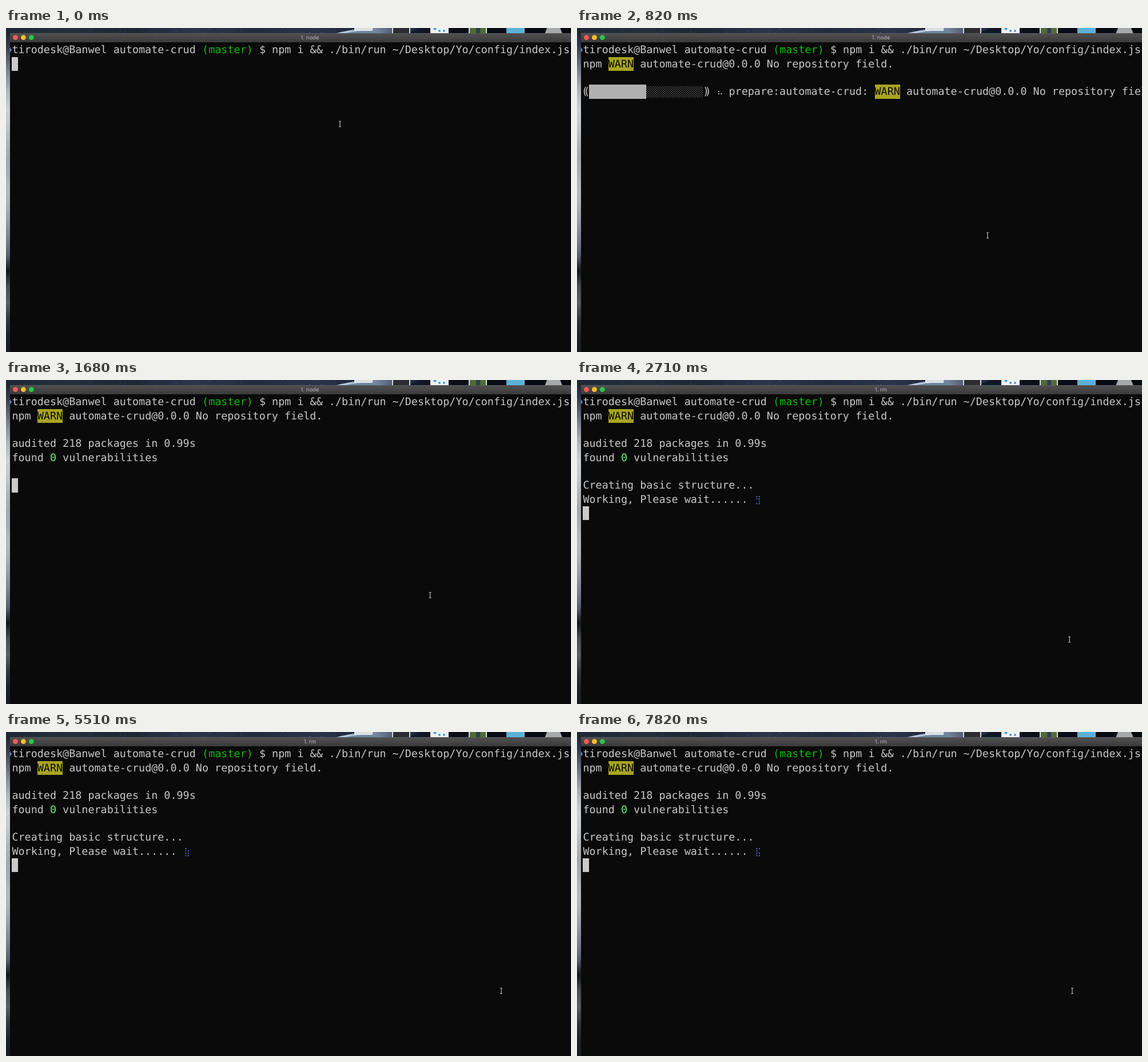
An HTML page with a canvas for the animation above (7.99 s loop, 988x567 px).

```html
<!DOCTYPE html>
<html lang="en">
<head>
<meta charset="utf-8">
<title>Terminal</title>
<style>
  html, body { margin: 0; width: 100%; height: 100%; overflow: hidden; background: #0a0a0a; }
  canvas { display: block; }
</style>
</head>
<body>
<canvas id="stage" width="988" height="567"></canvas>
<script>
const ctx = document.getElementById('stage').getContext('2d');
const LOOP = 7990;
const CELL = 11.09, LINE = 24.3, LEFT = 10.4, TOP = 26.4;
const FG = '#c7c7c7', GREY = '#b0b0b0', YELLOW = '#a9a51f';

const colX = col => LEFT + col * CELL;
const rowY = row => TOP + row * LINE;

function rect(x, y, w, h, fill) {
  ctx.fillStyle = fill;
  ctx.fillRect(x, y, w, h);
}

// Fills whole terminal cells, snapped to pixels.
function cells(row, col, count, fill) {
  const x = Math.round(colX(col)), y = Math.round(rowY(row));
  rect(x, y, Math.round(colX(col + count)) - x, Math.round(rowY(row + 1)) - y, fill);
}

function disc(x, y, r, fill) {
  ctx.fillStyle = fill;
  ctx.beginPath();
  ctx.arc(x, y, r, 0, Math.PI * 2);
  ctx.fill();
}

function gradient(x, y, colors) {
  const g = ctx.createLinearGradient(0, 0, x, y);
  colors.split(' ').forEach((c, i, all) => g.addColorStop(i / (all.length - 1), c));
  return g;
}

function text(row, col, string, color = FG, back) {
  if (back) cells(row, col, string.length, back);
  ctx.font = '18.42px "DejaVu Sans Mono", monospace';
  ctx.textRendering = 'geometricPrecision';
  ctx.textAlign = 'left';
  ctx.fillStyle = color;
  ctx.fillText(string, colX(col), rowY(row) + 18);
}

// Dot positions in braille bit order, as [column, line].
const DOTS = [[0, 0], [0, 1], [0, 2], [1, 0], [1, 1], [1, 2], [0, 3], [1, 3]];
function braille(row, col, char, color) {
  const bits = char.charCodeAt(0) - 0x2800;
  DOTS.forEach(([dx, dy], i) => {
    if (bits >> i & 1) rect(colX(col) + 3.6 + dx * 4.4, rowY(row) + 6.6 + dy * 4.1, 2, 2, color);
  });
}

function progress(row, filled, spin) {
  const top = Math.round(rowY(row)) + 3, left = Math.round(colX(1 + filled)), right = colX(19) - 1;
  for (let j = 0; j < 10; j++)
    for (let x = left + j % 2 * 2; x < right; x += 4)
      rect(x, top + j * 2, 1, 1.5, '#808080');
  cells(row, 1, filled, GREY);
  for (const shift of [-0.22, 0.1]) {
    text(row, shift, '(');
    text(row, 19 - shift, ')');
  }
  braille(row, 21, spin, FG);
}

const block = row => cells(row, 0, 1, '#cacaca');

function desktop() {
  rect(0, 0, 988, 10, gradient(988, 0, '#1f2736 #262e3e #1e2636 #2c3548 #232c3c #28344a #1a2232 #0c101c #080b14 #070910'));
  let seed = 7;
  const random = () => (seed = seed * 16807 % 2147483647) / 2147483647;
  for (let i = 0; i < 130; i++)
    rect(random() * 600, random() * 9, 1, 1, `rgba(160,175,205,${random() * 0.4})`);

  ctx.fillStyle = gradient(720, 0, '#9fb8d8 #9fb8d8 #9fb8d8 #9fb8d8 #a9c3e0 #b4c6da #18233a');
  ctx.beginPath();
  ctx.moveTo(574, 10);
  ctx.quadraticCurveTo(600, 3, 632, 0);
  ctx.lineTo(722, 0);
  ctx.lineTo(700, 10);
  ctx.fill();
  ctx.fillStyle = '#6f86a4';
  ctx.beginPath();
  ctx.moveTo(590, 10);
  ctx.quadraticCurveTo(610, 5, 645, 3);
  ctx.lineTo(660, 10);
  ctx.fill();

  rect(609, 0, 32, 5, '#e9ebed');
  rect(611, 1, 28, 2, '#cfd4d9');
  rect(675, 0, 32, 10, '#d9d9d9');
  rect(677, 0, 28, 9, '#2b2d33');
  rect(742, 0, 32, 10, '#eef2f5');
  disc(750, 1, 2.5, '#3aa0dc');
  disc(758, 5, 2, '#3aa0dc');
  disc(766, 5, 2, '#3aa0dc');
  rect(809, 0, 32, 10, '#dcdcdc');
  rect(811, 0, 28, 9, '#4f6b3c');
  rect(822, 0, 7, 9, '#31404a');
  rect(875, 0, 32, 9, '#5fb0d8');
  ctx.fillStyle = '#a6a8ab';
  ctx.beginPath();
  ctx.moveTo(946, 0);
  ctx.lineTo(969, 0);
  ctx.lineTo(973, 10);
  ctx.lineTo(942, 10);
  ctx.fill();

  rect(0, 10, 7, 557, gradient(0, 567,
    '#1c2434 #2c3648 #5a6474 #8a929e #b4b9c0 #cccfd3 #c4c8cd #b0b5bc #a2a8b2 #a8aeb8 #b4b9c0 #aab0b9 #929aa6 #7a8292 #5a6374 #14171d #4a4f58 #585d66 #30353f #1e222d #181a26'));
}

function chrome(title) {
  rect(7, 25, 981, 542, '#0a0a0a');
  rect(7, 9, 981, 16, gradient(0, 25, '#505050 #4c4c4c #3a3a3a'));
  rect(7, 9, 981, 1, '#5c5c5c');
  disc(16.5, 16.6, 4.4, '#fc5b57');
  disc(30.4, 16.6, 4.4, '#fdbd2e');
  disc(44.3, 16.6, 4.4, '#29c93f');
  ctx.font = '9.5px Inter, sans-serif';
  ctx.textAlign = 'center';
  ctx.fillStyle = '#b8b8b8';
  ctx.fillText(title, 531.5, 20);
  ctx.fillStyle = '#5b8fc4';
  ctx.beginPath();
  ctx.moveTo(7, 34);
  ctx.lineTo(10, 38.5);
  ctx.lineTo(7, 43);
  ctx.fill();
}

function pointer(x, y) {
  ctx.strokeStyle = '#d8d8d8';
  ctx.lineWidth = 1;
  ctx.beginPath();
  for (const s of [-1, 1]) {
    ctx.moveTo(x - 2, y + s * 5);
    ctx.lineTo(x, y + s * 4.5);
    ctx.lineTo(x + 2, y + s * 5);
  }
  ctx.moveTo(x, y - 4.5);
  ctx.lineTo(x, y + 4.5);
  ctx.stroke();
}

// The screen refreshes in bursts: [first, last, number of refreshes].
const TICKS = [[0, 0, 1], [300, 300, 1], [530, 820, 3], [1330, 2330, 7], [2510, 2920, 3], [3110, 3480, 3],
  [3690, 4550, 6], [4760, 5510, 5], [5660, 6840, 9], [6990, 7290, 3], [7580, 7820, 2]]
  .flatMap(([a, b, n]) => Array.from({ length: n }, (_, i) => n > 1 ? Math.round(a + (b - a) * i / (n - 1)) : a));

const PATH = [[0, 584, 168], [530, 584, 168], [675, 640, 250], [820, 718, 363], [1500, 718, 363],
  [2330, 838, 432], [2710, 887, 479], [3110, 919, 554], [3480, 905, 546], [4550, 866, 453], [LOOP, 866, 453]];

function pointerAt(t) {
  const i = PATH.findIndex(p => p[0] > t);
  const [t0, x0, y0] = PATH[i - 1], [t1, x1, y1] = PATH[i];
  const k = (t - t0) / (t1 - t0);
  return [x0 + (x1 - x0) * k, y0 + (y1 - y0) * k];
}

function terminal(t) {
  text(0, 0, 'tirodesk@Banwel automate-crud');
  text(0, 30, '(master)', '#0dbc0d');
  text(0, 39, '$ npm i && ./bin/run ~/Desktop/Yo/config/index.js');
  if (t < 300) return block(1);
  if (t < 820) {
    progress(1, 1, t < 530 ? '⠼' : '⠴');
    text(1, 23, 'loadIdealTree:loadAllDepsIntoIdealTree:');
    text(1, 63, 'sill', '#0a0a0a', GREY);
    text(1, 68, 'install', '#c930c7');
    return text(1, 76, 'loadIdealTre');
  }
  text(1, 0, 'npm');
  text(1, 4, 'WARN', '#0a0a0a', YELLOW);
  text(1, 9, 'automate-crud@0.0.0 No repository field.');
  if (t < 1330) {
    progress(3, 9, '⠦');
    text(3, 23, 'prepare:automate-crud:');
    text(3, 46, 'WARN', '#0a0a0a', YELLOW);
    return text(3, 51, 'automate-crud@0.0.0 No repository fiel');
  }
  text(3, 0, 'audited 218 packages in 0.99s');
  text(4, 0, 'found');
  text(4, 6, '0', '#5ffa68');
  text(4, 8, 'vulnerabilities');
  if (t < 1990) return block(6);
  text(6, 0, 'Creating basic structure...');
  if (t < 2150) return block(7);
  text(7, 0, 'Working, Please wait......');
  braille(7, 27, '⣾⣽⣻⢿⡿⣟⣯⣷'[Math.floor((t - 2141) / 146) % 8], '#6a67d8');
  block(8);
}

function draw(now) {
  const time = now % LOOP;
  const t = TICKS.filter(tick => tick <= time).pop();
  desktop();
  chrome(t < 2510 ? '1. node' : '1. rm');
  terminal(t);
  pointer(...pointerAt(t));
}

const start = performance.now();
function frame() {
  draw(performance.now() - start);
  requestAnimationFrame(frame);
}
frame();
</script>
</body>
</html>
```
